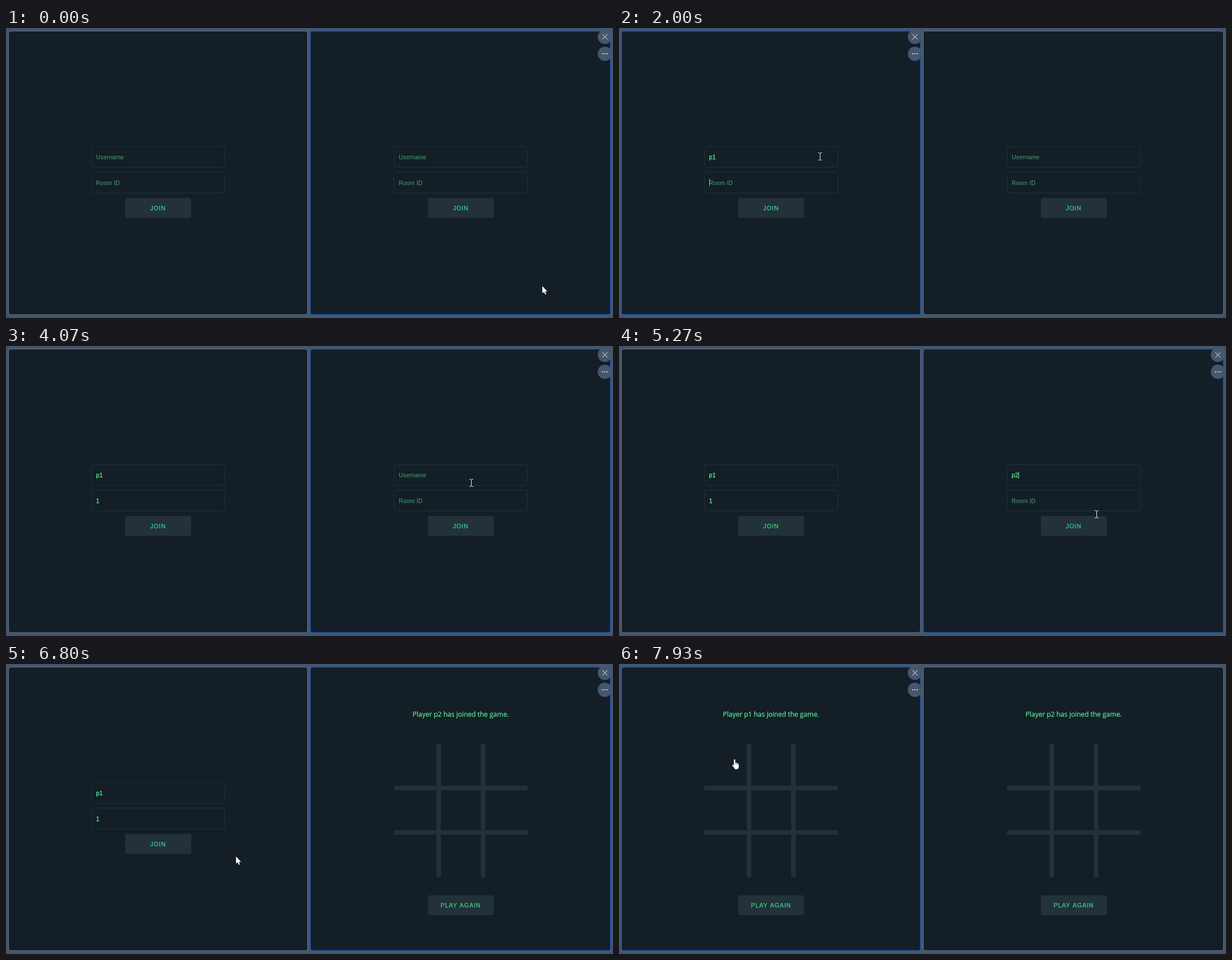
An HTML page with a canvas that plays this animation: 1082x517 px, repeating every 8000 ms.

```html
<!DOCTYPE html>
<html lang="en">
<head>
<meta charset="utf-8">
<title>Two player lobby</title>
<style>
html, body { margin: 0; width: 100%; height: 100%; overflow: hidden; background: #45566a; }
canvas { display: block; }
</style>
</head>
<body>
<canvas id="stage" width="1082" height="517"></canvas>
<script>
const ctx = document.getElementById('stage').getContext('2d');
const LOOP = 8000, FPS = 15, PANE_STEP = 539.5;
const UI = '10.56px "Liberation Sans", Arial, sans-serif';
const PROSE = '12px "Open Sans", "Noto Sans", sans-serif';
const C = {
  back: '#45566a', pane: '#141e26', edge: '#64748b', active: '#1d58b4',
  line: '#22313a', hover: '#2a3c46', hint: '#4a9f78', bright: '#62f09c',
  action: '#3ad683', chip: '#45576d', icon: '#f1f5f9'
};

// Pointer path: time, x, y of the hot spot
const path = [
  [0, 956, 460], [670, 358, 228], [800, 358, 228], [870, 358, 229], [2730, 358, 229],
  [3400, 838, 231], [3600, 838, 240], [3870, 829, 244], [5200, 829, 244],
  [5270, 851, 300], [5330, 845, 317], [5400, 845, 317], [5730, 830, 314], [5870, 830, 314],
  [6330, 790, 332], [6730, 535, 340], [6800, 410, 343], [7070, 270, 322],
  [7330, 262, 321], [7600, 252, 244], [7930, 206, 170]
];

// Value changes over time
const focus = [[0, 1], [670, 0], [3600, 1], [7130, 0]];
const forms = [
  { user: [[0, ''], [1400, 'p'], [1530, 'p1']], room: [[0, ''], [2600, '1']], joined: 7200 },
  { user: [[0, ''], [4530, 'p'], [4730, 'p2']], room: [[0, ''], [5600, '1']], joined: 5930 }
];
const caret = [
  [0, ''], [670, '0user'], [1130, ''], [1400, '0user'], [2000, '0room'], [2530, ''],
  [2600, '0room'], [3130, ''], [3600, '1user'], [4070, ''], [4530, '1user'],
  [5330, ''], [5470, '1room'], [5930, '']
];

const latest = (list, t) => list.reduce((v, [at, next]) => (t >= at ? next : v), list[0][1]);

function pointerAt(t) {
  if (t <= 0) return { x: path[0][1], y: path[0][2] };
  const i = path.findIndex(p => p[0] >= t);
  if (i < 0) return { x: path.at(-1)[1], y: path.at(-1)[2] };
  const [t0, x0, y0] = path[i - 1], [t1, x1, y1] = path[i];
  let u = (t - t0) / (t1 - t0);
  if (Math.hypot(x1 - x0, y1 - y0) > 300) u = u * u * (3 - 2 * u);
  return { x: Math.round(x0 + (x1 - x0) * u), y: Math.round(y0 + (y1 - y0) * u) };
}

const inside = (p, x, y, w, h) => p.x >= x && p.x <= x + w && p.y >= y && p.y <= y + h;

function box(x, y, w, h, r, fill, stroke, width = 1) {
  ctx.beginPath();
  ctx.roundRect(x, y, w, h, r);
  if (fill) { ctx.fillStyle = fill; ctx.fill(); }
  if (stroke) { ctx.strokeStyle = stroke; ctx.lineWidth = width; ctx.stroke(); }
}

function label(text, x, y, font, color, { spacing = 0, align = 'left', weight = 0 } = {}) {
  ctx.font = font;
  ctx.letterSpacing = spacing + 'px';
  ctx.textAlign = align;
  ctx.fillStyle = ctx.strokeStyle = color;
  ctx.fillText(text, x, y);
  if (weight) {
    ctx.lineWidth = weight;
    ctx.strokeText(text, x, y);
  }
}

function field(value, hint, y, hasCaret) {
  box(152.5, y, 237.5, 37, 4, null, C.line);
  label(value || hint, 160.6, y + 22.5, UI, value ? C.bright : C.hint, { spacing: 0.1, weight: value ? 0.3 : 0 });
  return hasCaret ? 160.6 + (value ? ctx.measureText(value).width : 0) : null;
}

function button(text, y, hovered) {
  box(212.5, y, 117.5, 35.5, 3, hovered ? C.hover : C.line);
  label(text, 271.1, y + 21.7, UI, C.action, { spacing: 0.98, align: 'center', weight: 0.25 });
}

function form(i, t, p) {
  const f = forms[i], on = latest(caret, t);
  const bars = ['user', 'room'].map((name, row) => {
    const x = field(latest(f[name], t), ['Username', 'Room ID'][row], 211.5 + row * 45.5, on === i + name);
    return x === null ? null : [x, 224 + row * 45];
  });
  button('JOIN', 303, inside(p, 212, 303, 118, 35));
  return bars.find(Boolean);
}

function game(i) {
  label(`Player p${i + 1} has joined the game.`, 271, 94.3, PROSE, C.bright, { align: 'center', weight: 0.2 });
  ctx.fillStyle = C.line;
  for (const d of [0, 79.2]) {
    ctx.fillRect(227.8 + d, 142, 8, 238);
    ctx.fillRect(152.2, 217.3 + d, 238, 8);
  }
  button('PLAY AGAIN', 412.3, false);
}

function pane(i, t, p) {
  const dx = i * PANE_STEP;
  const active = latest(focus, t) === i;
  box(i ? 542.5 : 4.5, 5.5, i ? 535 : 533, 505.5, 4, C.pane, active ? C.active : C.edge, active ? 1.5 : 1);
  ctx.save();
  ctx.translate(dx, 0);
  let bar;
  if (t >= forms[i].joined) game(i);
  else bar = form(i, t, { x: p.x - dx, y: p.y });
  ctx.restore();
  if (bar) {
    ctx.fillStyle = C.bright;
    ctx.fillRect(Math.round(bar[0] + dx), bar[1], 1, 12.5);
  }
}

function disc(x, y, r, color) {
  ctx.beginPath();
  ctx.arc(x, y, r, 0, Math.PI * 2);
  ctx.fillStyle = color;
  ctx.fill();
}

function chips(i) {
  const x = i ? 1067.5 : 527.5;
  disc(x, 15.7, 12.7, C.chip);
  disc(x, 46, 12.7, C.chip);
  ctx.strokeStyle = C.icon;
  ctx.lineWidth = 1;
  ctx.beginPath();
  for (const s of [-1, 1]) {
    ctx.moveTo(x - 4.6, 15.7 - 4.6 * s);
    ctx.lineTo(x + 4.6, 15.7 + 4.6 * s);
  }
  ctx.stroke();
  for (const d of [-4, 0, 4]) disc(x + d, 46, 1.1, C.icon);
}

const shapes = {
  arrow: new Path2D('M0 0V13L3 10.4L5 15L7 14.2L5.1 9.7H9Z'),
  beam: new Path2D('M-3 -6.5H-1L.5 -5.5L2 -6.5H4M.5 -5.5V5.5M-3 6.5H-1L.5 5.5L2 6.5H4'),
  hand: new Path2D('M-1.3 1.2Q-1.3 0 0 0T1.3 1.2V6Q3.5 5.2 3.9 6.7Q5.7 6.2 5.9 7.7Q7.6 7.5 7.6 9V12.5Q7.6 15 6.2 16V17.5H0V16L-4 11.3Q-4.6 9.4 -3 9.5L-1.3 11Z')
};

function pointerKind(p, t) {
  const i = p.x > 541 ? 1 : 0;
  const q = { x: p.x - i * PANE_STEP, y: p.y };
  if (t >= forms[i].joined) return inside(q, 152, 142, 238, 238) || inside(q, 212, 412, 118, 36) ? 'hand' : 'arrow';
  if (inside(q, 152, 211, 238, 38) || inside(q, 152, 257, 238, 44)) return 'beam';
  return inside(q, 212, 303, 118, 35) ? 'hand' : 'arrow';
}

function pointer(p, t) {
  const kind = pointerKind(p, t), shape = shapes[kind];
  ctx.save();
  ctx.translate(p.x, p.y);
  ctx.lineJoin = 'round';
  if (kind === 'beam') {
    ctx.strokeStyle = '#e8ecee';
    ctx.lineWidth = 1;
    ctx.stroke(shape);
  } else {
    ctx.strokeStyle = '#0b1014';
    ctx.lineWidth = 1.2;
    ctx.stroke(shape);
    ctx.fillStyle = '#fff';
    ctx.fill(shape);
    if (kind === 'hand') {
      ctx.lineWidth = 0.5;
      ctx.stroke(new Path2D('M1.5 6V9.5M3.8 7V10M5.9 8V10.5'));
    }
  }
  ctx.restore();
}

function draw(t) {
  const p = pointerAt(t);
  ctx.fillStyle = C.back;
  ctx.fillRect(0, 0, 1082, 517);
  pane(0, t, p);
  pane(1, t, p);
  // The window chips trail the pointer slightly
  chips(pointerAt(t - 133).x > 540 ? 1 : 0);
  pointer(p, t);
}

const start = performance.now();
function tick() {
  const t = (performance.now() - start) % LOOP;
  const step = Math.floor((t + 5) * FPS / 1000) % (LOOP * FPS / 1000);
  draw(Math.round(step * 100 / FPS) * 10);
  requestAnimationFrame(tick);
}
tick();
</script>
</body>
</html>
```
